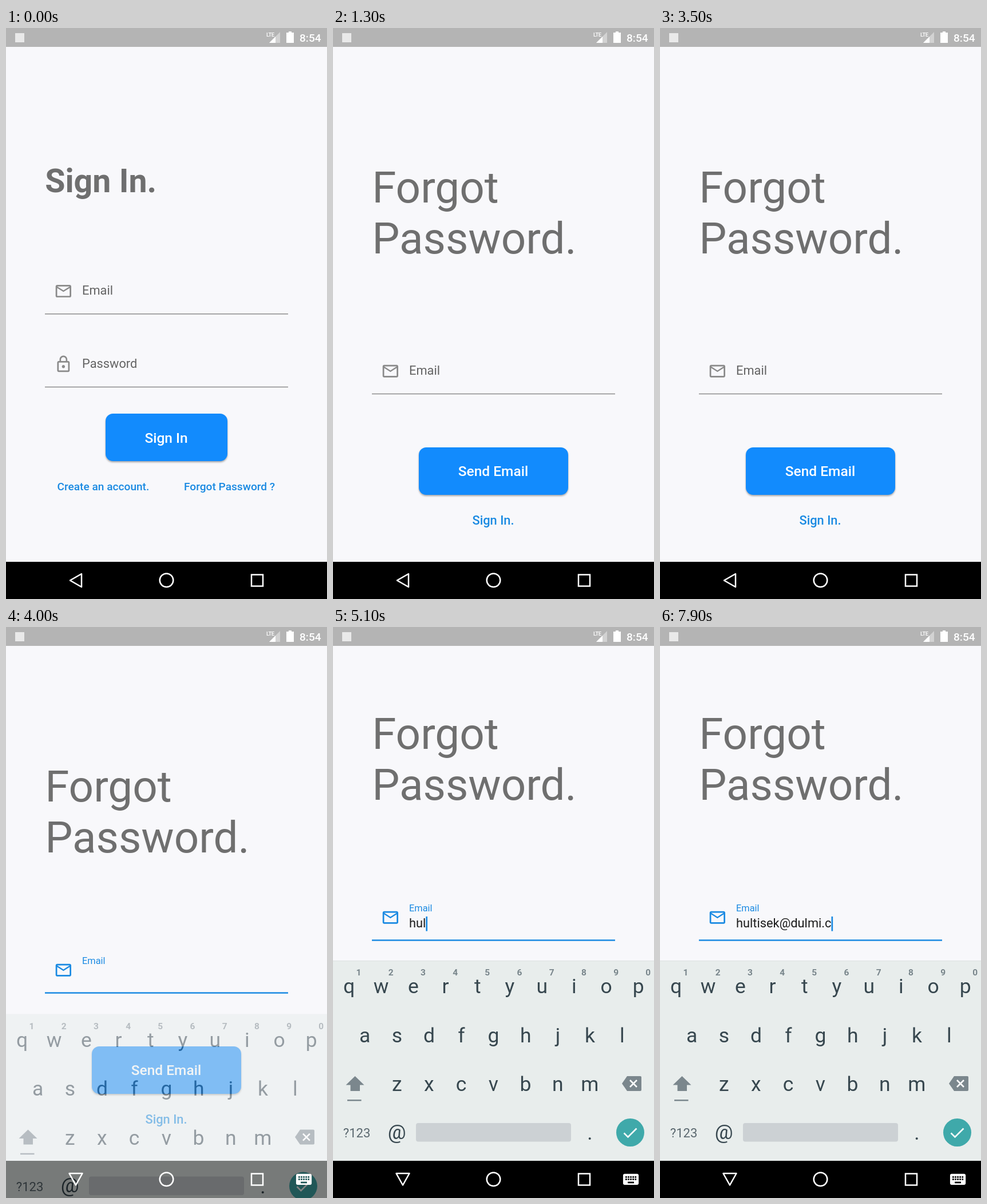
An HTML page for the animation above (8000 ms loop, 561 px wide and 998 px high).

```html
<!DOCTYPE html>
<html lang="en">
<head>
<meta charset="utf-8">
<title>Forgot password</title>
<style>
  html, body { margin: 0; height: 100%; overflow: hidden; background: #f8f8fb; }
  svg { display: block; width: 561px; height: 998px; font-family: Roboto, sans-serif; }
  .mid { text-anchor: middle; }
  .medium { font-weight: 500; }
  .link { font-weight: 500; fill: #1a8ae2; }
  .title { fill: #6f6f6f; }
  .field { font-size: 21.82px; fill: #646464; }
  .button rect { fill: #128bfd; filter: drop-shadow(0 2px 1.5px #0005); }
  .button text { fill: #fff; font-size: 24.5px; font-weight: 500; text-anchor: middle; }
  .icon { fill: #8a8a8a; }
  .nav { fill: none; stroke: #fff; stroke-width: 2.5; }
  .key { fill: #37474f; font-size: 35.5px; text-anchor: middle; }
  .digit { fill: #78858b; font-size: 15.5px; font-weight: 700; text-anchor: middle; }
  .soft { fill: #7b878d; }
</style>
</head>
<body>
<svg viewBox="0 0 561 998">
  <defs>
    <path id="mail" transform="scale(1.3636)" d="M20 4H4c-1.1 0-2 .9-2 2v12c0 1.1.9 2 2 2h16c1.1 0 2-.9 2-2V6c0-1.1-.9-2-2-2zm0 14H4V8l8 5 8-5v10zm-8-7L4 6h16l-8 5z"/>
    <path id="lock" transform="scale(1.3636)" d="M12 17c1.1 0 2-.9 2-2s-.9-2-2-2-2 .9-2 2 .9 2 2 2zm6-9h-1V6c0-2.76-2.24-5-5-5S7 3.24 7 6v2H6c-1.1 0-2 .9-2 2v10c0 1.1.9 2 2 2h12c1.1 0 2-.9 2-2V10c0-1.1-.9-2-2-2zM8.9 6c0-1.71 1.39-3.1 3.1-3.1s3.1 1.39 3.1 3.1v2H8.9V6zM18 20H6V10h12v10z"/>
  </defs>

  <g id="signIn">
    <rect width="561" height="998" fill="#f8f8fb"/>
    <text class="title" x="68.2" y="287" font-size="57.3" font-weight="700">Sign In.</text>
    <use class="icon" href="#mail" x="84" y="443.6"/>
    <text class="field" x="133" y="466">Email</text>
    <use class="icon" href="#lock" x="84" y="571.2"/>
    <text class="field" x="133" y="593.5">Password</text>
    <path d="M68 499.7H493M68 627.5H493" stroke="#8b8b8b" stroke-width="1.4"/>
    <g class="button">
      <rect x="174" y="674" width="213" height="83" rx="13"/>
      <text x="280" y="725">Sign In</text>
    </g>
    <text class="link" x="89.5" y="807.5" font-size="19.1">Create an account.</text>
    <text class="link" x="311" y="807.5" font-size="19.1">Forgot Password ?</text>
  </g>

  <g id="forgot">
    <rect width="561" height="1200" fill="#f8f8fb"/>
    <g id="content">
      <g class="title" font-size="76.36">
        <text x="68.2" y="304.5">Forgot</text>
        <text x="68.2" y="394">Password.</text>
      </g>
      <use id="mailIcon" class="icon" href="#mail" x="84" y="583.4"/>
      <text id="label" class="field">Email</text>
      <text id="typed" class="field" x="133" y="617" style="fill:#1c1c1c"></text>
      <rect id="cursor" y="598" width="2.7" height="25.5" fill="#1a8ae2"/>
      <path id="line" d="M68 639.5H493"/>
      <g class="button">
        <rect x="150" y="733" width="261" height="83" rx="13"/>
        <text x="280" y="783.3">Send Email</text>
      </g>
      <text class="link mid" x="280" y="867.5" font-size="21.82">Sign In.</text>
    </g>
  </g>

  <rect width="561" height="33" fill="#b4b4b4"/>
  <g fill="#fff">
    <rect x="16" y="9" width="16" height="16" fill="#e9e9e9"/>
    <text class="medium" x="455" y="15" font-size="9.5" textLength="" letter-spacing="-.6">LTE</text>
    <path d="M460 26L479 7V26Z" fill="#d2d2d2"/>
    <path d="M460 26L471 15V26Z"/>
    <path d="M494 6H499V8H503V26H490V8H494Z"/>
    <text class="medium" x="513" y="24" font-size="19.1">8:54</text>
  </g>

  <rect y="933" width="561" height="65"/>
  <g id="keyboard">
    <rect y="583" width="561" height="1" fill="#dde1e2"/>
    <rect y="584" width="561" height="349" fill="#e8edec"/>
    <g id="keys"></g>
    <g class="soft">
      <path d="M38.5 785L54.5 800.5H47V811H30.5V800.5H22.5Z"/>
      <rect x="25" y="826" width="24.5" height="2.5"/>
      <path d="M514 785H537Q539 785 539 787V809Q539 811 537 811H514L505 798Z"/>
    </g>
    <path d="M519 792L531 804M531 792L519 804" stroke="#fff" stroke-width="2.6"/>
    <text x="41.5" y="892" class="mid" font-size="22" fill="#5b686f">?123</text>
    <rect x="145" y="867" width="271" height="32.5" rx="4" fill="#ccd1d4"/>
    <circle cx="519.5" cy="883.5" r="24.5" fill="#3fa9aa"/>
    <path d="M508.5 884.5L515.5 891.5L530.5 876.5" fill="none" stroke="#fff" stroke-width="2.6"/>
  </g>

  <path id="back" class="nav" d="M112 965.5L132 954V977Z" stroke-linejoin="round"/>
  <circle class="nav" cx="280.5" cy="965.3" r="11.8"/>
  <rect class="nav" x="429" y="955.5" width="20" height="20"/>
  <path id="switcher" fill="#fff" transform="translate(504.2 949) scale(1.3636)" d="M20 5H4c-1.1 0-1.99.9-1.99 2L2 17c0 1.1.9 2 2 2h16c1.1 0 2-.9 2-2V7c0-1.1-.9-2-2-2zm-9 3h2v2h-2V8zm0 3h2v2h-2v-2zM8 8h2v2H8V8zm0 3h2v2H8v-2zm-1 2H5v-2h2v2zm0-3H5V8h2v2zm9 7H8v-2h8v2zm0-4h-2v-2h2v2zm0-3h-2V8h2v2zm3 3h-2v-2h2v2zm0-3h-2V8h2v2z"/>
</svg>
<script>
const LOOP = 8000, BLINK = 600;
const ROUTE = 400, FOCUS = 3510, KEYBOARD = 4000, SCROLL = 4250;
const EMAIL = 'hultisek@dulmi.c';
const TYPED_AT = [4800, 5000, 5100, 5200, 5400, 5600, 5700, 5800,
                  6700, 6900, 7000, 7200, 7400, 7600, 7800, 7900];

const $ = id => document.getElementById(id);
const set = (id, attrs) => {
  for (const name in attrs) $(id).setAttribute(name, attrs[name]);
};
const show = (id, on) => set(id, { visibility: on ? 'visible' : 'hidden' });
const progress = (t, start, length) => Math.min(1, Math.max(0, (t - start) / length));
const ease = p => 1 - (1 - p) ** 3;
const mix = (a, b, p) => a + (b - a) * p;
const blend = (a, b, p) => `rgb(${a.map((v, i) => Math.round(mix(v, b[i], p)))})`;

const row = (chars, x, y, type = 'key') => [...chars].map((c, i) =>
  `<text class="${type}" x="${x + 56.2 * i}" y="${y}">${c}</text>`).join('');

$('keys').innerHTML =
  row('qwertyuiop', 28, 640) + row('1234567890', 45, 609, 'digit') +
  row('asdfghjkl', 55.7, 725.5) + row('zxcvbnm', 111.7, 811) +
  row('@', 111.7, 894.5) + row('.', 449, 896);

function drawField(t) {
  const p = ease(progress(t, FOCUS, 200));
  const blue = [26, 138, 226];
  const scale = mix(1, 0.75, p);
  set('label', { transform: `translate(133 ${mix(606, 589, p)}) scale(${scale})` });
  $('label').style.fill = blend([100, 100, 100], blue, p);
  $('mailIcon').style.fill = blend([138, 138, 138], blue, p);
  set('line', { stroke: blend([139, 139, 139], blue, p), 'stroke-width': mix(1.4, 2.7, p) });

  const count = TYPED_AT.filter(at => at <= t).length;
  $('typed').textContent = EMAIL.slice(0, count);
  const width = count ? $('typed').getComputedTextLength() : 0;
  const since = t - (count ? TYPED_AT[count - 1] : 3400);
  set('cursor', { x: 133 + width });
  show('cursor', t >= FOCUS && since % (2 * BLINK) < BLINK);
}

function draw(t) {
  const route = progress(t, ROUTE, 300);
  set('forgot', { transform: `translate(0 ${250 * (1 - ease(route))})`, opacity: route ** 1.6 });
  set('content', { transform: `translate(0 ${-92 * ease(progress(t, SCROLL, 130))})` });
  drawField(t);

  const open = t >= KEYBOARD;
  const rest = (1 - progress(t, KEYBOARD, 200)) ** 5;
  show('keyboard', open);
  show('switcher', open);
  set('keyboard', { transform: `translate(0 ${96 * rest})`, opacity: 1 - rest / 2 });
  set('back', { d: open ? 'M110.5 955H133.5L122 975.5Z' : 'M112 965.5L132 954V977Z' });
}

function tick() {
  draw(performance.now() % LOOP);
  requestAnimationFrame(tick);
}
tick();
</script>
</body>
</html>
```
